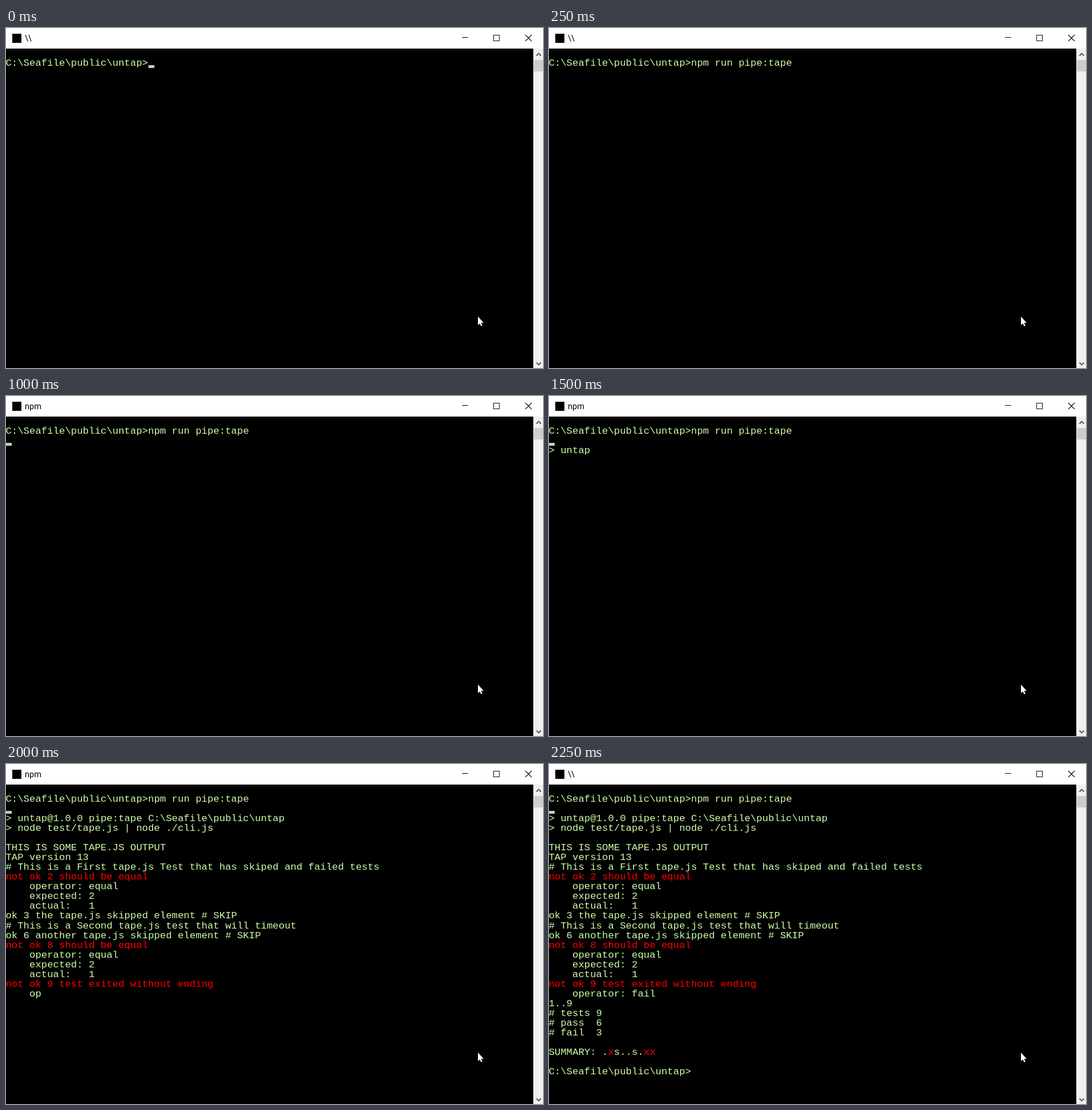
Animation, 941 px wide and 595 px high, one loop 4.5 s. Source, as an HTML page with a canvas:

```html
<!DOCTYPE html>
<html lang="en">
<head>
<meta charset="utf-8">
<title>Terminal</title>
<style>
  html, body { margin: 0; width: 100%; height: 100%; overflow: hidden; background: #000; }
  canvas { display: block; }
</style>
</head>
<body>
<canvas id="stage" width="941" height="595"></canvas>
<script>
const ctx = document.getElementById('stage').getContext('2d');
const LOOP = 4500;
const CELL = 10.4, PITCH = 17.04, LEFT = -0.6, BASELINE = 66;
const GREEN = '#ccffaa', RED = '#ff0000', GREY = '#c8c8c8';
const PROMPT = 'C:\\Seafile\\public\\untap>';
const COMMAND = 'npm run pipe:tape';

const HEADER = [
  '> untap@1.0.0 pipe:tape C:\\Seafile\\public\\untap',
  '> node test/tape.js | node ./cli.js',
];
const REPORT = [
  'THIS IS SOME TAPE.JS OUTPUT',
  'TAP version 13',
  '# This is a First tape.js Test that has skiped and failed tests',
  'not ok 2 should be equal',
  '    operator: equal',
  '    expected: 2',
  '    actual:   1',
  'ok 3 the tape.js skipped element # SKIP',
  '# This is a Second tape.js test that will timeout',
  'ok 6 another tape.js skipped element # SKIP',
  'not ok 8 should be equal',
  '    operator: equal',
  '    expected: 2',
  '    actual:   1',
  'not ok 9 test exited without ending',
];
const ENDING = [
  '    operator: fail',
  '1..9',
  '# tests 9',
  '# pass  6',
  '# fail  3',
  '',
  'SUMMARY: ',
  '',
  PROMPT,
];

function rect(color, x, y, w, h) {
  ctx.fillStyle = color;
  ctx.fillRect(x, y, w, h);
}

function path(points, close) {
  ctx.beginPath();
  points.forEach(([x, y]) => ctx.lineTo(x, y));
  if (close) ctx.closePath();
}

function line(color, width, ...points) {
  path(points);
  ctx.strokeStyle = color;
  ctx.lineWidth = width;
  ctx.stroke();
}

function print(text, row, col = 0, color = text.startsWith('not ok') ? RED : GREEN) {
  ctx.fillStyle = color;
  ctx.fillText(text, LEFT + col * CELL, BASELINE + row * PITCH);
}

function printLines(lines, row) {
  lines.forEach((text, i) => print(text, row + i));
}

function drawTitleBar(title) {
  rect('#fff', 0, 0, 941, 36);
  rect('#000', 11, 10, 16, 16);
  ctx.font = '14.6px Roboto, sans-serif';
  ctx.fillStyle = '#000';
  ctx.fillText(title, 33, 23);
  rect('#000', 799, 16, 11, 1);
  ctx.strokeStyle = '#000';
  ctx.lineWidth = 1;
  ctx.strokeRect(854.5, 12.5, 10, 10);
  line('#000', 1.1, [910, 12], [921, 23]);
  line('#000', 1.1, [921, 12], [910, 23]);
}

function drawScrollBar() {
  rect('#f0f0f0', 924, 36, 17, 559);
  rect('#cdcdcd', 925, 56, 16, 20);
  line('#505050', 1.8, [929.5, 48.5], [933.5, 44.5], [937.5, 48.5]);
  line('#505050', 1.8, [929.5, 585.5], [933.5, 589.5], [937.5, 585.5]);
}

function drawPointer() {
  path([[827, 505], [827, 520], [830.3, 517], [832.6, 522],
        [834.8, 521], [832.6, 516], [837, 516]], true);
  ctx.fillStyle = '#fff';
  ctx.fill();
}

function drawSummaryMarks(row) {
  [...'.xs..s.xx'].forEach((mark, i) =>
    print(mark, row, 9 + i, mark === 'x' ? RED : GREEN));
}

function titleAt(t) {
  if (t < 750 || t >= 2250) return '\\\\';
  return t < 1000 ? '\\\\ - npm  run pipe:tape' : 'npm';
}

function drawConsole(t) {
  ctx.font = '17.33px "Liberation Mono", monospace';
  print(PROMPT, 0);
  if (t < 250) rect(GREY, 249.5, 65, 10.5, 5);
  else print(COMMAND, 0, PROMPT.length);
  if (t >= 1000) rect(GREY, 0, 82, 10, 5);
  if (t >= 1750) printLines(HEADER, 2);
  else if (t >= 1500) print('> untap', 2);
  if (t >= 2000) printLines(REPORT, 5);
  if (t >= 2250) {
    printLines(ENDING, 20);
    drawSummaryMarks(26);
  } else if (t >= 2000) {
    print('    op', 20);
  }
}

function draw(t) {
  rect('#000', 0, 0, 941, 595);
  drawConsole(t);
  drawTitleBar(titleAt(t));
  drawScrollBar();
  drawPointer();
}

const start = performance.now();
function tick() {
  draw((performance.now() - start) % LOOP);
  requestAnimationFrame(tick);
}
tick();
</script>
</body>
</html>
```
